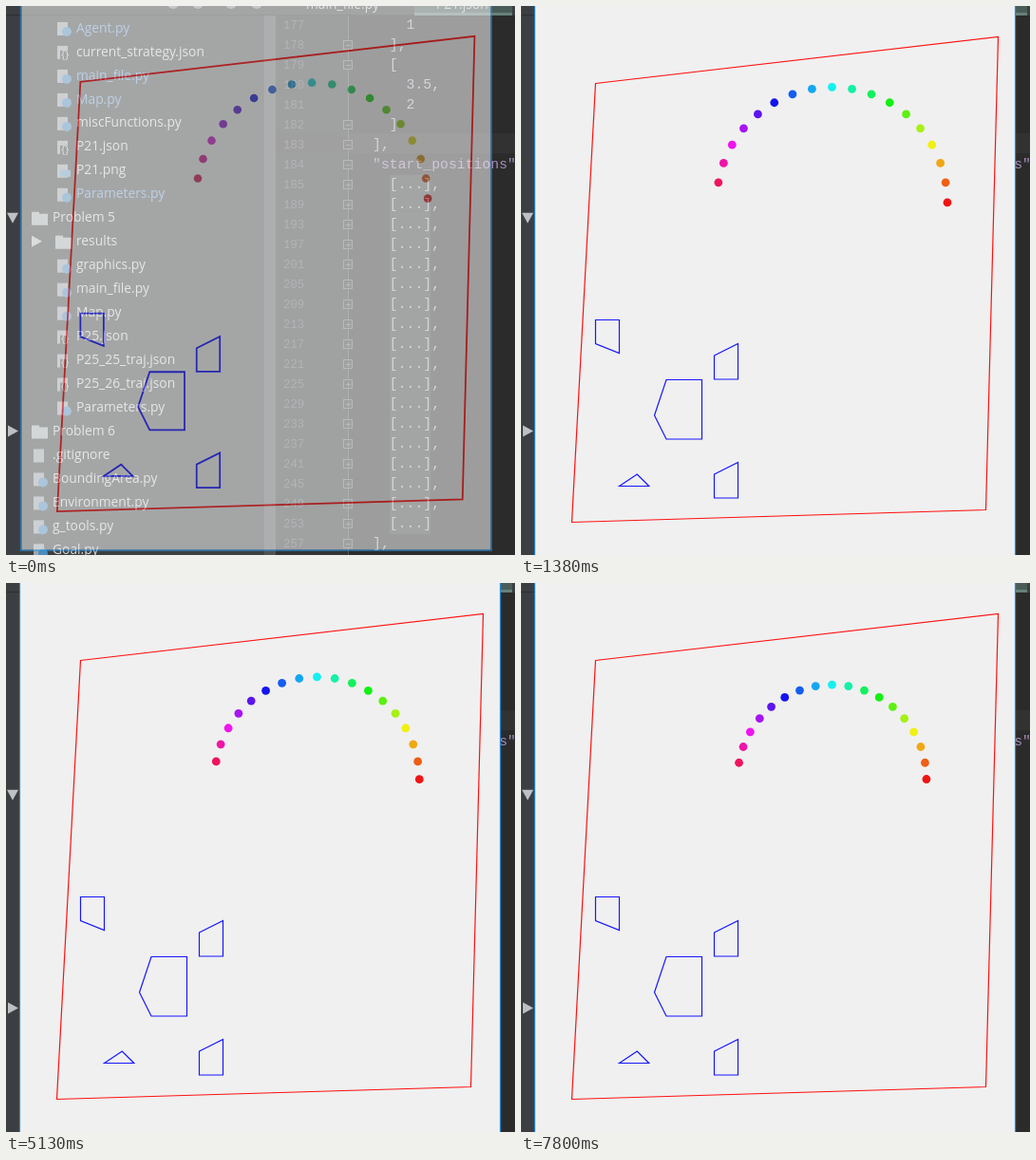
An HTML page with a canvas for the animation above (8 s loop, 536 px wide and 578 px high).

```html
<!DOCTYPE html>
<html lang="en">
<head>
<meta charset="utf-8">
<title>Window opening over an editor</title>
<style>
html, body { margin: 0; width: 100%; height: 100%; overflow: hidden; background: #2b2b2b; }
canvas { position: absolute; left: 0; top: 0; }
</style>
</head>
<body>
<canvas id="editor" width="536" height="578"></canvas>
<canvas id="window" width="536" height="578"></canvas>
<script>
const LOOP = 8000;
const editor = document.getElementById('editor').getContext('2d');
const pane = document.getElementById('window');
const win = pane.getContext('2d');

function box(c, color, x, y, w, h) {
  c.fillStyle = color;
  c.fillRect(x, y, w, h);
}

function disc(c, color, x, y, radius) {
  c.fillStyle = color;
  c.beginPath();
  c.arc(x, y, radius, 0, 2 * Math.PI);
  c.fill();
}

function polygon(c, points) {
  c.beginPath();
  points.forEach(([x, y]) => c.lineTo(x, y));
  c.closePath();
}

function label(c, str, x, y, color, font) {
  c.font = font;
  c.fillStyle = color;
  c.textBaseline = 'middle';
  c.fillText(str, x, y);
}

// ---- Editor behind the window ----

const UI = '13.8px "Open Sans", sans-serif';
const CODE = '14.8px "Liberation Mono", monospace';
const NUMBERS = '12.3px "Liberation Mono", monospace';

// Leading ">" nests an entry, "*" marks it as changed, "/" as a folder.
const TREE = `>*Agent.py >current_strategy.json >*main_file.py >*Map.py >miscFunctions.py
  >P21.json >P21.png >*Parameters.py /Problem~5 >/results >graphics.py >main_file.py
  >Map.py >P25.json >P25_25_traj.json >P25_26_traj.json >Parameters.py /Problem~6
  .gitignore BoundingArea.py Environment.py g_tools.py Goal.py`.split(/\s+/);

// Code above and below the folded rows, indented by two spaces per level.
const HEAD = ['    1', '  ],', '  [', '    3.5,', '    2', '  ]', '],', '"start_positions"'];
const FOLDED = 18;

function arrow(x, y, open) {
  editor.fillStyle = '#bcc1c3';
  polygon(editor, open ? [[x - 6, y - 5], [x + 6, y - 5], [x, y + 6]]
                       : [[x - 5, y - 6], [x + 6, y], [x - 5, y + 6]]);
  editor.fill();
}

function fileIcon(name, x, y) {
  box(editor, '#9fa6ab', x + 2, y - 7, 11, 14);
  if (name.endsWith('.json')) {
    box(editor, '#3c3f41', x + 5, y - 2, 12, 11);
    label(editor, '{}', x + 6, y + 3, '#d8d8d8', '11px "Open Sans", sans-serif');
  } else if (name.endsWith('.png')) {
    box(editor, '#6b9fc4', x + 5, y - 1, 11, 7);
  } else if (name.endsWith('.py')) {
    disc(editor, '#4b8bbe', x + 12, y + 3, 5);
  }
}

function drawTree() {
  TREE.forEach((entry, i) => {
    const y = 24 + 24.97 * i;
    const x = entry.includes('>') ? 52 : 27;
    const name = entry.replace(/[>*/]/g, '').replace('~', ' ');
    if (entry.includes('/')) {
      box(editor, '#afb5b8', x, y - 7, 8, 4);
      box(editor, '#afb5b8', x, y - 5, 17, 12);
      arrow(x - 20, y - 1, name === 'Problem 5');
    } else {
      fileIcon(name, x, y);
    }
    label(editor, name, x + 22, y, entry.includes('*') ? '#78a8d8' : '#d8dadb', UI);
  });
}

function foldMark(y, plus) {
  box(editor, '#313335', 355, y - 5, 10, 10);
  editor.strokeStyle = '#6c6f71';
  editor.strokeRect(355.5, y - 4.5, 9, 9);
  box(editor, '#6c6f71', 358, y, 5, 1);
  if (plus) box(editor, '#6c6f71', 360, y - 2, 1, 5);
}

function drawCode() {
  const folds = Array.from({ length: FOLDED }, (_, i) => i < FOLDED - 1 ? '  [...],' : '  [...]');
  box(editor, '#313335', 284, 10, 76, 568);
  box(editor, '#323232', 284, 134, 252, 21);
  box(editor, '#555859', 360, 10, 1, 568);
  box(editor, '#393b3b', 404, 178, 43, 378);
  [...HEAD, ...folds, '],'].forEach((str, row) => {
    const y = 20 + 21 * row;
    const number = 177 + row + 3 * Math.max(0, row - HEAD.length);
    label(editor, number, 292, y + 1, '#5f6366', NUMBERS);
    if (/[[\]"]/.test(str)) foldMark(y, str.includes('...'));
    label(editor, str, 386, y, str[0] === '"' ? '#a78cbc' : '#a9b4be', CODE);
  });
}

function drawEditor() {
  box(editor, '#2b2b2b', 0, 0, 536, 578);
  box(editor, '#3c3f41', 0, 0, 284, 578);
  box(editor, '#505355', 272, 10, 12, 568);
  box(editor, '#3c3f41', 284, 0, 252, 10);
  box(editor, '#4a5c58', 430, 0, 103, 10);
  box(editor, '#67807b', 430, 7, 103, 3);
  box(editor, '#2b2d2e', 0, 9, 430, 1);
  label(editor, 'main_file.py', 316, -1, '#d0d0d0', UI);
  label(editor, 'P21.json', 453, -1, '#d0d0d0', UI);
  [176, 202, 237, 264].forEach(x => disc(editor, '#8b9093', x, -3, 6));
  drawTree();
  drawCode();
}

// ---- Plot window ----

const UNIT = 12.5;
const ROBOTS = 18;
const OPEN_TIME = 210;
const MOVE_START = 230;
const MOVE_STEP = 304;
const MOVE_TIME = 7570;

const BORDER = [[78, 81], [502, 32], [489, 530], [53, 543]];

// Obstacles: top left corner, then outline in plot units.
const TRAPEZOID = [[0, 1], [2, 0], [2, 3], [0, 3]];
const OBSTACLES = [
  [78, 330, [[0, 0], [2, 0], [2, 2.8], [0, 2]]],
  [203, 355, TRAPEZOID],
  [203, 480, TRAPEZOID],
  [140, 393, [[1, 0], [4, 0], [4, 5], [1, 5], [0, 3]]],
  [103, 492.5, [[0, 1], [1.5, 0], [2.5, 1]]]
];

function outline(points, color) {
  win.strokeStyle = color;
  polygon(win, points);
  win.stroke();
}

// Robots stand 10 degrees apart on a circle that slowly contracts.
function drawRobots(progress, saturation) {
  const radius = 124.6 - 26.1 * progress;
  for (let i = 0; i < ROBOTS; i++) {
    const angle = i * Math.PI / ROBOTS;
    const x = 327 + radius * Math.cos(angle);
    const y = 206.5 - 0.5 * progress - radius * Math.sin(angle);
    disc(win, `hsl(${i * 360 / ROBOTS}, ${saturation}%, 51%)`, x, y, 4.4);
  }
}

function drawWindow(time) {
  const unopened = Math.max(0, 1 - time / OPEN_TIME) ** 2;
  const scale = 1 - 0.021 * unopened;
  const step = Math.max(0, Math.floor((time - MOVE_START) / MOVE_STEP));

  pane.style.opacity = 1 - 0.42 * unopened;
  win.setTransform(1, 0, 0, 1, 0, 0);
  win.clearRect(0, 0, 536, 578);
  win.setTransform(scale, 0, 0, scale, 1.5 * unopened + 0.5, 0.5);

  box(win, '#f0f0f0', 14, -40, 506, 625);
  win.lineWidth = 1.2 + 0.6 * unopened;
  win.strokeStyle = '#2490e0';
  win.strokeRect(14, -40, 506, 625);
  outline(BORDER, '#ff1010');
  OBSTACLES.forEach(([left, top, shape]) =>
    outline(shape.map(([x, y]) => [left + x * UNIT, top + y * UNIT]), '#1616ff'));
  drawRobots(step * MOVE_STEP / MOVE_TIME, 88 - 30 * unopened);
}

// The opening advances in 70 ms ticks, like the window manager's animation.
let begin = null;
function frame(now) {
  if (begin === null) begin = now;
  const time = Math.max(0, now - begin) % LOOP;
  drawWindow(time < MOVE_START ? Math.floor(time / 70) * 70 : time);
  requestAnimationFrame(frame);
}

drawEditor();
drawWindow(0);
requestAnimationFrame(frame);
</script>
</body>
</html>
```
